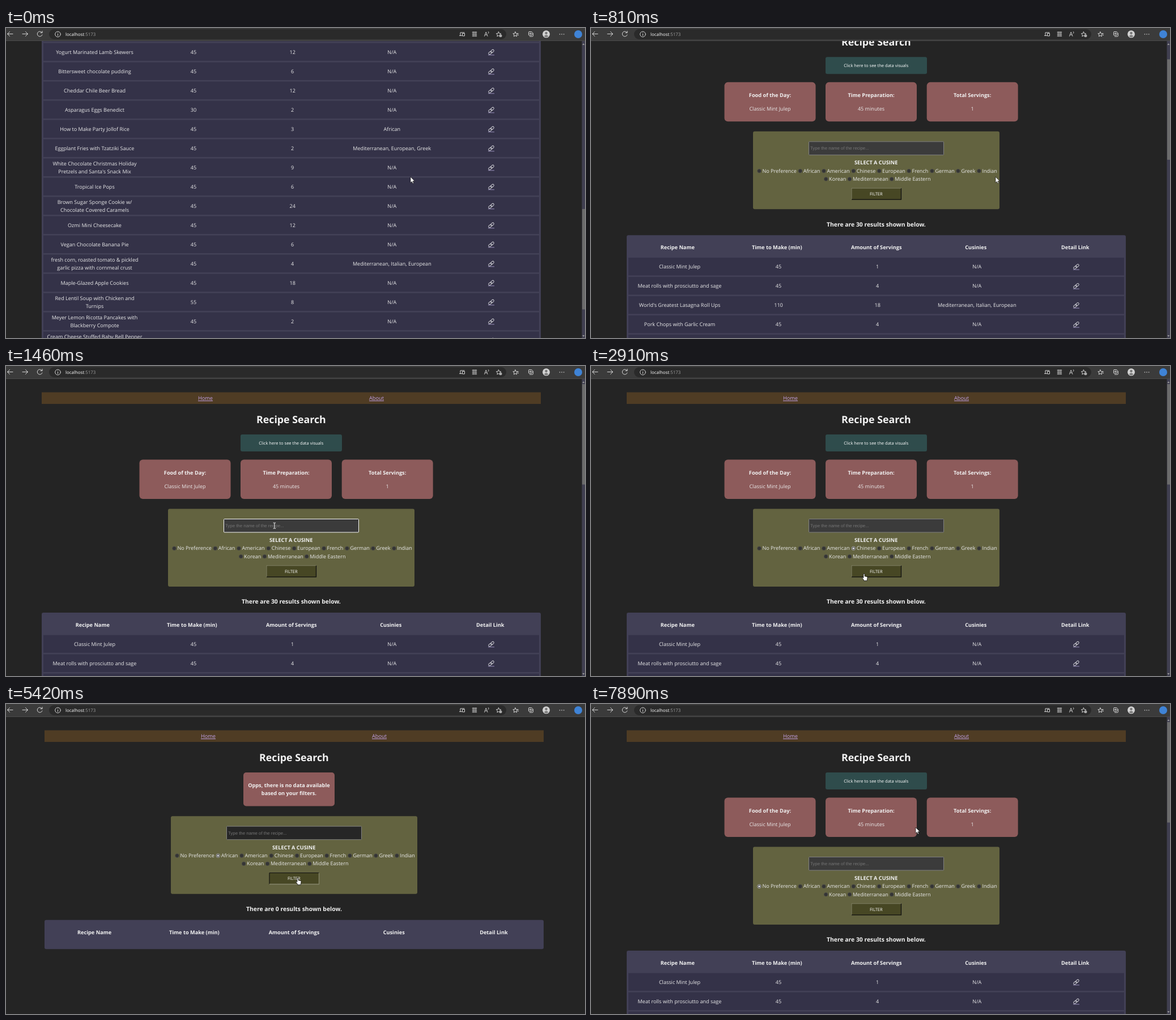
An HTML page that plays this animation: 1022x548 px, repeating every 8 s.

```html
<!DOCTYPE html>
<html lang="en">
<head>
<meta charset="utf-8">
<title>Recipe Search</title>
<style>
  html, body { margin: 0; height: 100%; overflow: hidden; background: #242424; }
  svg { display: block; width: 100%; height: 100%; }
  text { font: 9.07px "Open Sans", "Noto Sans", sans-serif; fill: #eaeaea; text-rendering: geometricPrecision; white-space: pre; }
  .m { text-anchor: middle; }
  .b { font-weight: 700; font-size: 9.2px; fill: #f2f2f2; }
  .h1 { font-weight: 700; font-size: 17.8px; fill: #f2f2f2; }
  .sum { font-weight: 700; font-size: 10.4px; fill: #f2f2f2; }
  .btn { font-size: 7.55px; fill: #fff; }
  .url { font-size: 7.9px; fill: #fff; }
  .nav { font-size: 9.2px; fill: #c3a2ea; text-decoration: underline; }
  .hint { font: 7.85px "Liberation Sans", Arial, sans-serif; fill: #757575; }
  .line { fill: none; stroke: #d4d4d4; stroke-linecap: round; stroke-linejoin: round; }
</style>
</head>
<body>
<svg viewBox="0 0 1022 548">
  <defs>
    <g id="link">
      <g class="line" style="stroke:#c9c9cf" transform="rotate(-40)" stroke-width="1">
        <rect x="-5.6" y="-1.9" width="6.4" height="3.8" rx="1.9"/>
        <rect x="-.8" y="-1.9" width="6.4" height="3.8" rx="1.9"/>
      </g>
      <path d="M-5.5 5.3H5.5" stroke="#b3a8d8" stroke-width=".8"/>
    </g>
    <path id="star" d="M0-4.2 1.3-1.4 4.2-1.1 2 .9 2.6 3.9 0 2.4-2.6 3.9-2 .9-4.2-1.1-1.3-1.4Z"/>
  </defs>
  <rect width="1022" height="548" fill="#242424"/>
  <g id="page"></g>
  <g id="bar">
    <rect x="1016.5" y="23" width="5.5" height="525" fill="#403f50"/>
    <path d="M1017.3 30 1019.3 27 1021.3 30ZM1017.3 543 1019.3 546 1021.3 543Z" fill="#999"/>
    <rect id="thumb" x="1017" width="5" height="177.5" fill="#6b6b6b"/>
  </g>
  <g id="chrome">
    <rect width="1022" height="22" fill="#3b3b3b"/>
    <rect y="22" width="1022" height="1" fill="#4a4a4a"/>
    <rect x="76" y="2" width="807" height="18" rx="9" fill="#2a2a2a"/>
    <g class="line" stroke-width="1">
      <path d="M12 10.5H2.5M6.5 6.5 2.5 10.5 6.5 14.5M29 10.5H38.5M34.5 6.5 38.5 10.5 34.5 14.5"/>
      <path d="M63.5 8A4.5 4.5 0 1 0 64 12M64 5.5V8.5H61"/>
      <circle cx="91.5" cy="11" r="4.8"/><path d="M91.5 10.5V13.5M91.5 8.3V8.4"/>
      <path d="M802 13V8H809M800.5 13.5H804.5M806 9.5H809.5V14H806Z"/>
      <path d="M823 7.5H831M823 10.8H831M823 14H831M824.5 6.5V15M827 6.5V15M829.5 6.5V15" stroke-width=".8"/>
      <path d="M844.5 14.5 847.3 7 850 14.5M845.5 12H849M851.5 6.5Q853 8 851.5 9.5" stroke-width=".9"/>
      <use href="#star" x="869.5" y="11"/>
      <use href="#star" x="899" y="11"/><path d="M902.5 10H904.5M903 12.5H904.5"/>
      <rect x="922.5" y="6.5" width="6" height="6.5" rx="1"/><path d="M924.5 15H929Q930.5 15 930.5 13.5V9M925.5 8.3V11.3M924 9.8H927"/>
    </g>
    <circle cx="873" cy="13.8" r="2.5" fill="#aaa"/>
    <circle cx="953.5" cy="10.8" r="6.5" fill="#d2d2d2"/>
    <circle cx="953.5" cy="9" r="2.2" fill="#777"/><path d="M949.5 14.8Q953.5 9.8 957.5 14.8 953.5 17.5 949.5 14.8Z" fill="#777"/>
    <path d="M977.4 11h.1M981 11h.1M984.6 11h.1" class="line" stroke-width="1.6"/>
    <circle cx="1010" cy="11" r="7" fill="#3f83d6"/>
    <text class="url" x="105" y="13.8">localhost<tspan fill="#a0a0a0">:5173</tspan></text>
  </g>
  <g id="cursor"></g>
</svg>
<script>
const $ = id => document.getElementById(id);

// name (~ breaks the line) | minutes | servings | cuisine
const recipes = `Classic Mint Julep|45|1
Meat rolls with prosciutto and sage|45|4
World's Greatest Lasagna Roll Ups|110|18|Mediterranean, Italian, European
Pork Chops with Garlic Cream|45|4
Baked Apple Oat Crumble|45|6
Spinach and Feta Parcels|45|4
Roasted Pumpkin Soup|50|8
Lemon Herb Rice Salad|45|3
Coconut Lime Macaroons|45|12
Creamy Mushroom Polenta|45|4|Mediterranean, Italian, European
Blueberry Almond Muffins|45|10
Grilled Peach Flatbread|45|2
Yogurt Marinated Lamb Skewers|45|12
Bittersweet chocolate pudding|45|6
Cheddar Chile Beer Bread|45|12
Asparagus Eggs Benedict|30|2
How to Make Party Jollof Rice|45|3|African
Eggplant Fries with Tzatziki Sauce|45|2|Mediterranean, European, Greek
White Chocolate Christmas Holiday~Pretzels and Santa's Snack Mix|45|9
Tropical Ice Pops|45|6
Brown Sugar Sponge Cookie w/~Chocolate Covered Caramels|45|24
Ozmi Mini Cheesecake|45|12
Vegan Chocolate Banana Pie|45|6
fresh corn, roasted tomato & pickled~garlic pizza with cornmeal crust|45|4|Mediterranean, Italian, European
Maple-Glazed Apple Cookies|45|18
Red Lentil Soup with Chicken and~Turnips|55|8
Meyer Lemon Ricotta Pancakes with~Blackberry Compote|45|2
Cream Cheese Stuffed Baby Bell Pepper~Poppers|45|6
Honey Ginger Carrot Cake|45|8
Simple Tomato Bean Stew|45|4`.replace(/&/g, '&amp;').split('\n').map(r => r.split('|'));

const heads = ['Recipe Name', 'Time to Make (min)', 'Amount of Servings', 'Cusinies', 'Detail Link'];
// name, radio centre x, row
const radios = [['No Preference', 297, 0], ['African', 369.3, 0], ['American', 411, 0], ['Chinese', 463.3, 0],
  ['European', 508.7, 0], ['French', 561.2, 0], ['German', 602, 0], ['Greek', 648, 0], ['Indian', 685, 0],
  ['Korean', 414.7, 1], ['Mediterranean', 456.5, 1], ['Middle Eastern', 530.8, 1]];

const text = (s, x, y, cls = 'm') => `<text x="${x}" y="${y}" class="${cls}">${s}</text>`;
const rect = (x, y, w, h, fill, r = 0, more = '') =>
  `<rect x="${x}" y="${y}" width="${w}" height="${h}" rx="${r}" fill="${fill}" ${more}/>`;

function card(x, title, value) {
  return rect(x, 165.5, 161, 69.5, '#8d5b5b', 6) +
    text(title, x + 80.5, 191.8, 'm b') + text(value, x + 80.5, 215.7);
}

function form(empty, picked, hover, pressed) {
  const [light, dark] = pressed ? ['#111', '#85856a'] : ['#85856a', '#111'];
  let s = rect(286, 252.5, 435, 137.5, '#636340', 3) +
    rect(384.5, 270.5, 238, 23.5, empty ? '#262626' : '#3b3b3b', 1, `stroke="${hover ? '#f4f4f4' : '#808080'}"`) +
    text('Type the name of the recipe...', 387, 285, 'hint') +
    text('SELECT A CUSINE', 503.2, 311, 'm b');
  for (const [name, x, row] of radios) {
    const y = 322.4 + row * 14.3, on = name == picked;
    s += `<circle cx="${x}" cy="${y}" r="3.3" fill="#343434" stroke="${on ? '#c8c8c8' : '#4c4c48'}" stroke-width=".8"/>` +
      (on ? `<circle cx="${x}" cy="${y}" r="1.9" fill="#d0d0d0"/>` : '') +
      text(name, x + 5.4, y + 3, '');
  }
  return s + rect(459.5, 352.3, 88.5, 21, '#474724', 2) +
    `<path d="M460 373V352.8H548" fill="none" stroke="${light}"/>` +
    `<path d="M460 372.8H547.5V352.8" fill="none" stroke="${dark}" stroke-width="1.3"/>` +
    text('FILTER', 503.3, 365.6, 'm btn');
}

function table(list) {
  const n = list.length;
  let s = text(`There are ${n} results shown below.`, 503.4, 420.3, 'm sum') +
    rect(63, 436, 881, n ? 54.5 + 34 * n : 51.5, '#424056', 3);
  heads.forEach((h, i) => s += text(h, n ? 152.8 + 175.5 * i : 151.1 + 176.2 * i, 461, 'm b'));
  list.forEach(([name, time, serves, cuisine = 'N/A'], i) => {
    const y = 491.5 + 34 * i, lines = name.split('~');
    s += rect(66, y - 15.8, 875, 31.3, '#343248');
    lines.forEach((l, k) => s += text(l, 156.5, y + 3.3 + 14.2 * (k - (lines.length - 1) / 2)));
    s += text(time, 331, y + 3.3) + text(serves, 505.7, y + 3.3) + text(cuisine, 681.3, y + 3.3) +
      `<use href="#link" x="856.5" y="${y}"/>`;
  });
  return s;
}

function page(list, ...state) {
  const empty = !list.length;
  let s = rect(63, 46.5, 881, 20.5, '#4f3c24') + text('Home', 352, 60.2, 'm nav') + text('About', 654, 60.2, 'm nav') +
    text('Recipe Search', 503.4, 101, 'm h1');
  if (empty) {
    s += rect(414, 121, 161, 59.5, '#8d5b5b', 5) + text('Opps, there is no data available', 494.4, 147.2, 'm b') +
      text('based on your filters.', 494.4, 161.4, 'm b');
  } else {
    s += rect(414, 121, 179, 30, '#2f4c4c', 3) + text('Click here to see the data visuals', 503.3, 138.6, 'm btn') +
      card(235.5, 'Food of the Day:', list[0][0]) + card(414, 'Time Preparation:', list[0][1] + ' minutes') +
      card(592.7, 'Total Servings:', list[0][2]);
  }
  return s + `<g transform="translate(0 ${empty ? -54.3 : 0})">${form(empty, ...state)}${table(list)}</g>`;
}

const shapes = {
  arrow: '<path d="M0 0V10.6L2.4 8.4 4 12 5.7 11.2 4.1 7.7H7.4Z" fill="#fff" stroke="#000" stroke-width=".6"/>',
  hand: '<path d="M-1.1 1Q0-.9 1.1 1V4.7L5 5.4Q6.2 5.8 6.1 7.2L5.3 10.6V12.6H-.6V11L-3.4 7.6Q-3.4 6-1.1 7.6Z" fill="#fff" stroke="#000" stroke-width=".7"/>',
  beam: '<path d="M-2.2-5H-.5L0-4.4.5-5H2.2M0-4.4V4.4M-2.2 5H-.5L0 4.4.5 5H2.2" fill="none" stroke="#f4f4f4" stroke-width="1"/>'
};

// time, x, y, shape until the next entry
const moves = [[0, 714, 263, 'arrow'], [1070, 714, 263, 'arrow'], [1330, 540, 278, 'beam'], [1450, 474, 282, 'beam'],
  [1720, 472, 285, 'beam'], [1860, 470, 297, 'arrow'], [2360, 465, 324, 'arrow'], [2620, 465, 324, 'arrow'],
  [2800, 479, 358, 'hand'], [2900, 482, 367, 'hand'], [3190, 482, 367, 'beam'], [3500, 482, 367, 'arrow'],
  [3840, 371, 308, 'arrow'], [4350, 331, 263, 'arrow'], [4620, 364, 266, 'arrow'], [4870, 374, 268, 'arrow'],
  [5000, 464, 279, 'arrow'], [5150, 496, 304, 'hand'], [5290, 515, 307, 'hand'], [5480, 515, 307, 'arrow'],
  [6060, 300, 322, 'arrow'], [6320, 300, 322, 'arrow'], [6700, 460, 354, 'hand'], [6800, 473, 360, 'hand'],
  [6950, 479, 362, 'hand'], [7230, 479, 362, 'arrow'], [7370, 608, 407, 'arrow'], [7510, 671, 420, 'arrow'],
  [7870, 573, 218, 'arrow'], [8000, 573, 218, 'arrow']];
const scrolls = [[0, 857], [130, 800], [270, 560], [410, 380], [540, 270], [670, 150], [800, 70], [940, 18], [1070, 0], [8000, 0]];

function at(keys, t) {
  const i = Math.max(1, keys.findIndex(k => k[0] > t)), a = keys[i - 1], b = keys[i];
  const p = (t - a[0]) / (b[0] - a[0]);
  return a.map((v, j) => typeof v == 'number' ? v + (b[j] - v) * p : v);
}

const put = (el, key, make) => { if (el.key != key) { el.key = key; el.innerHTML = make(); } };

function draw(now) {
  const t = now % 8000;
  // the screen was sampled about 7.5 times a second
  const q = Math.min(7990, Math.floor((t + 40) / 133.5) * 133.5);
  const view = t < 3190 || t >= 7110 ? 'all' : t < 5550 ? 'none' : 'one';
  const picked = t < 2640 ? '' : t < 4880 ? 'Chinese' : t < 6190 ? 'African' : 'No Preference';
  const hover = t >= 1330 && t < 1840, pressed = t >= 5400 && t < 5550;
  const list = { all: recipes, none: [], one: [recipes[16]] }[view];
  const scroll = at(scrolls, q)[1], [, x, y, shape] = at(moves, q);

  put($('page'), [view, picked, hover, pressed].join(), () => page(list, picked, hover, pressed));
  $('page').setAttribute('transform', `translate(${view == 'all' ? 0 : 5} ${-scroll})`);
  $('bar').setAttribute('display', view == 'all' ? 'inline' : 'none');
  $('thumb').setAttribute('y', 32 + scroll * .336);
  put($('cursor'), shape, () => shapes[shape]);
  $('cursor').setAttribute('transform', `translate(${x} ${y})`);
}

const start = performance.now();
function tick() {
  draw(performance.now() - start);
  requestAnimationFrame(tick);
}
tick();
</script>
</body>
</html>
```
